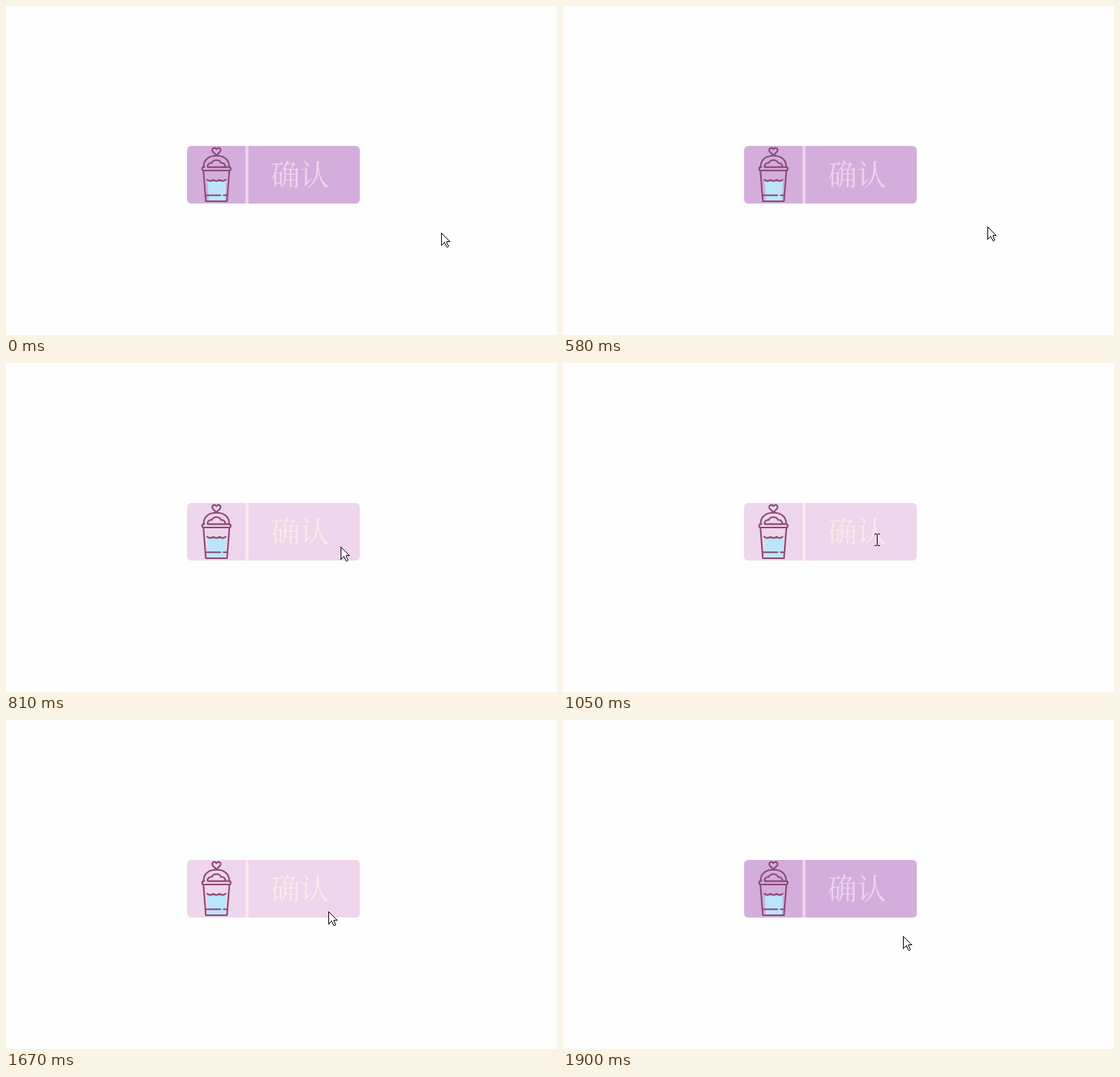
Animation, 718 px wide and 428 px high, one loop 2.53 s. Source, as an HTML page:

```html
<!DOCTYPE html>
<html lang="zh-CN">
<head>
<meta charset="utf-8">
<title>确认</title>
<style>
  html, body { margin: 0; width: 100%; height: 100%; overflow: hidden; background: #fefefe; }
  svg { display: block; }
  #button { --bg: #d3aedc; --ink: #ebd5ea; }
  #button.hover { --bg: #eed6ec; --ink: #ffe8e8; }
  .bg { fill: var(--bg); }
  .ink { fill: var(--ink); }
  text { font: 300 38px "Noto Serif CJK SC", "Noto Sans CJK SC", "Noto Sans CJK", serif; }
  .icon { fill: none; stroke: #8e4a76; stroke-width: 2.1; stroke-linecap: round; stroke-linejoin: round; }
  #pointer, #caret { stroke: #0c0812; shape-rendering: crispEdges; }
</style>
</head>
<body>
<svg width="718" height="428" viewBox="0 0 718 428">
  <defs>
    <path id="arrow" d="M.5 .5V16.5L4.5 12.5L6.5 17.5L7.5 18.5H8.5L9.5 17.5L7.5 12.5V11.5H11.5Z"/>
    <clipPath id="below"><rect x="400" y="257" width="60" height="30"/></clipPath>
  </defs>

  <g id="button">
    <rect class="bg" x="236" y="182" width="225" height="75" rx="5.5"/>
    <rect class="ink" x="312" y="182" width="4" height="75"/>
    <text class="ink" x="345" y="233">确认</text>
    <path fill="#b9e6fb" d="M262.5 227q4 3.4 8 0q4 3.4 8 0q4 3.4 8 0L285.6 253H264.5Z"/>
    <g class="icon">
      <path d="M274.2 194.2L269.4 189.4C267 186 271.5 182.7 274.2 186.4C277 182.7 281.4 186 279 189.4Z"/>
      <path d="M257.6 208.5C257.6 199.5 265 194.7 274.2 194.7S290.8 199.5 290.8 208.5"/>
      <path d="M262.8 209C262.4 205.6 265 203.9 268.2 204.3C269.6 199.2 278.8 199.2 280.2 204.3C283.4 203.9 286 205.6 285.6 209"/>
      <path d="M258.6 209.6H257.4Q255.6 209.6 255.6 211.8T257.4 214H291Q292.8 214 292.8 211.8T291 209.6H262.8"/>
      <path d="M257.3 214.5L260.4 254H288L291.1 214.5"/>
      <path d="M262.2 226q4 3.4 8 0q4 3.4 8 0q4 3.4 8 0"/>
      <path d="M260.8 246.2H279.4M283.6 246.2H287.8"/>
    </g>
  </g>

  <use id="trace" href="#arrow" x="420" y="249" clip-path="url(#below)" fill="none" stroke="#f5e8f5"/>
  <use id="pointer" href="#arrow" fill="#fff"/>
  <path id="caret" fill="none" d="M-3 -7.5H0M1 -7.5H4M-3 7.5H0M1 7.5H4M.5 -7V7"/>
</svg>

<script>
  const LOOP = 2530, TICK = 77, LEAVE = 1670;
  const hold = () => 0;
  const easeIn = p => p ** 1.5;
  const easeOut = p => p * (2 - p);

  // Pointer path; the easing leads on to the next point.
  const path = [
    { t: 0, x: 567, y: 295, ease: hold },
    { t: 430, x: 564, y: 292, ease: easeIn },
    { t: 740, x: 474, y: 251, ease: hold },
    { t: 810, x: 436, y: 239, ease: easeOut },
    { t: 1050, x: 409, y: 230, ease: hold },
    { t: 1600, x: 411, y: 236, ease: hold },
    { t: LEAVE, x: 420, y: 249, ease: easeOut },
    { t: 1900, x: 443, y: 281, ease: hold }
  ];

  function locate(t) {
    const i = path.findLastIndex(point => point.t <= t);
    const a = path[i], b = path[i + 1] ?? { ...a, t: LOOP };
    const span = b.t - a.t, ticks = Math.round(span / TICK);
    const p = a.ease(Math.floor((t - a.t) / span * ticks) / ticks);
    const mix = (u, v) => Math.round(u + (v - u) * p);
    return [mix(a.x, b.x), mix(a.y, b.y)];
  }

  const [button, trace, pointer, caret] =
    ["button", "trace", "pointer", "caret"].map(id => document.getElementById(id));
  const show = (el, on) => el.setAttribute("visibility", on ? "visible" : "hidden");
  const start = performance.now();

  function draw(now) {
    const t = Math.max(0, now - start) % LOOP;
    const [x, y] = locate(t);
    const hover = x < 461 && y < 257;
    const overText = x < 420 && y < 245;
    button.classList.toggle("hover", hover);
    for (const el of [pointer, caret]) el.setAttribute("transform", `translate(${x} ${y})`);
    show(pointer, !overText);
    show(caret, overText);
    show(trace, t > LEAVE && !hover);
    requestAnimationFrame(draw);
  }
  draw(start);
</script>
</body>
</html>
```
